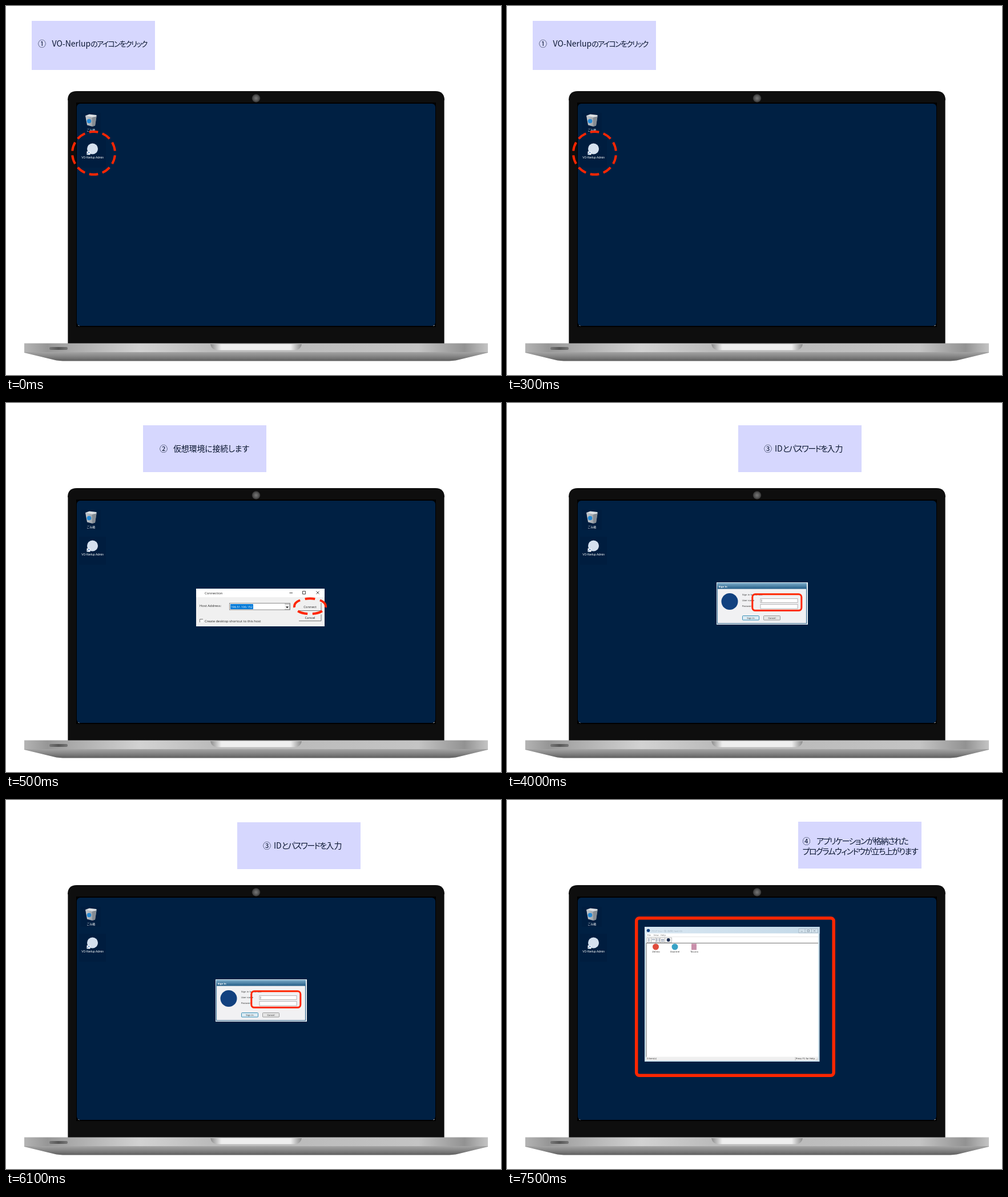
Animation of 867 by 646 pixels, one loop 8000 ms. Source, as an HTML page:

```html
<!DOCTYPE html>
<html lang="ja">
<head>
<meta charset="utf-8">
<title>Connection guide</title>
<style>
  html, body { margin: 0; width: 100%; height: 100%; overflow: hidden; background: #fff; }
  svg { display: block; width: 867px; height: 646px; }

  .scene { opacity: 0; animation: 8s step-end infinite; }
  .click { animation-name: click; }
  .connect { animation-name: connect; }
  .signin { animation-name: signin; }
  .programs { animation-name: programs; }
  @keyframes click { 0% { opacity: 1 } 6.25%, 100% { opacity: 0 } }
  @keyframes connect { 0% { opacity: 0 } 6.25% { opacity: 1 } 50%, 100% { opacity: 0 } }
  @keyframes signin { 0% { opacity: 0 } 50% { opacity: 1 } 93.75%, 100% { opacity: 0 } }
  @keyframes programs { 0% { opacity: 0 } 93.75%, 100% { opacity: 1 } }

  text { white-space: pre; }
  .note rect { fill: #d6d7fe; }
  .note text { font: 500 14px "Noto Sans CJK JP", "Noto Sans CJK", sans-serif; font-feature-settings: "palt"; fill: #0a1630; }
  .tight { letter-spacing: -1.5px; }
  .small { font-size: 13px; letter-spacing: -1.7px; }
  .mark { fill: none; stroke: #ff2600; }
  .desk { font: 5px "Liberation Sans", "Noto Sans CJK JP", sans-serif; fill: #fff; }
  .dialog { font: 5.9px "Open Sans", sans-serif; fill: #222; }
  .tiny { font: 3.9px "DejaVu Sans", "Noto Sans CJK JP", sans-serif; fill: #333; }
  .mid { text-anchor: middle; }
</style>
</head>
<body>
<svg viewBox="0 0 867 646">
  <defs>
    <linearGradient id="deck">
      <stop offset="0" stop-color="#b4b4b4"/>
      <stop offset=".05" stop-color="#969696"/>
      <stop offset=".1" stop-color="#a9a9a9"/>
      <stop offset=".25" stop-color="#d2d2d2"/>
      <stop offset=".4" stop-color="#bcbcbc"/>
      <stop offset=".6" stop-color="#bcbcbc"/>
      <stop offset=".85" stop-color="#c4c4c4"/>
      <stop offset=".95" stop-color="#929292"/>
      <stop offset="1" stop-color="#c4c4c4"/>
    </linearGradient>
    <linearGradient id="belly" x2="0" y2="1">
      <stop offset="0" stop-color="#a8a8a8"/>
      <stop offset=".5" stop-color="#868686"/>
      <stop offset="1" stop-color="#5e5e5e"/>
    </linearGradient>
    <linearGradient id="notch">
      <stop offset="0" stop-color="#8b8b8b"/>
      <stop offset=".12" stop-color="#eee"/>
      <stop offset=".88" stop-color="#eee"/>
      <stop offset="1" stop-color="#8b8b8b"/>
    </linearGradient>
    <linearGradient id="slot">
      <stop offset="0" stop-color="#777"/>
      <stop offset=".5" stop-color="#555"/>
      <stop offset="1" stop-color="#777"/>
    </linearGradient>
    <radialGradient id="lens">
      <stop offset="0" stop-color="#777"/>
      <stop offset=".6" stop-color="#555"/>
      <stop offset="1" stop-color="#333"/>
    </radialGradient>
    <linearGradient id="bar" x2="0" y2="1">
      <stop offset="0" stop-color="#7eaecb"/>
      <stop offset="1" stop-color="#235c86"/>
    </linearGradient>
    <linearGradient id="pale">
      <stop offset="0" stop-color="#d9e7f2"/>
      <stop offset="1" stop-color="#c3d9e8"/>
    </linearGradient>
    <linearGradient id="bin">
      <stop offset="0" stop-color="#c6cacf"/>
      <stop offset="1" stop-color="#868d95"/>
    </linearGradient>
  </defs>

  <!-- Laptop -->
  <path d="M108 591V165Q108 149 124 149H752Q768 149 768 165V591Z" fill="#0e0e0e"/>
  <path d="M108.500 591V165M767.500 591V165" stroke="#666"/>
  <rect x="123" y="169" width="630" height="393" fill="#000"/>
  <path d="M126 559l3 1M748 560l3-1" stroke="#aaa"/>
  <rect x="124" y="171" width="628" height="389" rx="6" fill="#002043"/>
  <circle cx="438" cy="161.500" r="7.200" fill="url(#lens)"/>
  <path d="M32 605H844V607L792 619.500Q784 621.500 770 621.500H106Q92 621.500 84 619.500L32 607Z" fill="url(#belly)"/>
  <rect x="32" y="590.500" width="812" height="15.500" fill="url(#deck)"/>
  <path d="M358 592H518Q516 602.500 505 602.500H371Q360 602.500 358 592Z" fill="url(#notch)"/>
  <rect x="76" y="597" width="32" height="5" rx="2" fill="url(#slot)"/>

  <!-- Desktop icons -->
  <g class="desk">
    <path d="M131 187H166V222H131ZM128 234H175V283H128Z" fill="#001d3f"/>
    <path d="M139 192L158.500 193.500L156 209.500L151 211L142 208.500Z" fill="url(#bin)"/>
    <path d="M139 192L146 189.500L158.500 191L158.500 193.500L151 195Z" fill="#dcdfe2"/>
    <path d="M151 195L151 211L156 209.500L158.500 193.500Z" fill="#858c94"/>
    <circle cx="145.500" cy="201.500" r="3.800" fill="#2589d5"/>
    <text class="mid" x="148.700" y="219">ごみ箱</text>
    <circle cx="151.500" cy="250" r="9.500" fill="#d5e0ee"/>
    <rect x="141.500" y="254.500" width="6" height="6" fill="#fff"/>
    <path d="M143 259.500V258L145.500 256M144 256H146V258" fill="none" stroke="#1f5fae" stroke-width=".8"/>
    <text class="mid" x="151.700" y="266.500">VO-Nerlup Admin</text>
  </g>

  <g class="scene click">
    <g class="note">
      <rect x="45" y="26" width="216" height="86"/>
      <text x="56" y="71">①</text>
      <text x="80.500" y="71">VO-Nerlup<tspan class="small">のアイコンをクリック</tspan></text>
    </g>
    <circle class="mark" cx="153.500" cy="257.500" r="37.500" stroke-width="4" pathLength="240" stroke-dasharray="16 8" stroke-dashoffset="20"/>
  </g>

  <g class="scene connect">
    <g class="note">
      <rect x="240" y="39" width="216" height="82"/>
      <text x="269" y="85">②</text>
      <text x="293" y="85" letter-spacing="-.2">仮想環境に接続します</text>
    </g>
    <g class="dialog">
      <rect x="333" y="325" width="225" height="66" fill="#f0f0f0"/>
      <rect x="333" y="325" width="225" height="15" fill="#fff"/>
      <text x="348" y="334.500">Connection</text>
      <path d="M496.500 332.500H502M519.500 329.500H524.500V334.500H519.500ZM543.500 329.500L548.500 334.500M548.500 329.500L543.500 334.500" fill="none" stroke="#333" stroke-width=".9"/>
      <text x="339" y="357">Host Address:</text>
      <rect x="391.500" y="350.500" width="106" height="11.500" fill="#fff" stroke="#8c8c8c"/>
      <rect x="393" y="352" width="40" height="9" fill="#0078d7"/>
      <text x="393.500" y="359" fill="#fff" font-size="5.400">198.51.100.152</text>
      <path d="M488 352H497V361.500H488" fill="#f0f0f0" stroke="#777" stroke-width=".7"/>
      <path d="M490 356.500H495L492.500 359Z" fill="#000"/>
      <path d="M513 363.500H552V350M513 381.500H552V370" fill="none" stroke="#777"/>
      <text class="mid" x="532.500" y="359">Connect</text>
      <text class="mid" x="532.500" y="377.500">Cancel</text>
      <path d="M339.500 384V378.500H345" fill="none" stroke="#777"/>
      <path d="M340 384V379H345V384Z" fill="#fff"/>
      <text x="348" y="384">Create desktop shortcut to this host</text>
    </g>
    <ellipse class="mark" cx="532.500" cy="355.700" rx="27.500" ry="13.500" stroke-width="4" pathLength="120" stroke-dasharray="16 8" stroke-dashoffset="14"/>
  </g>

  <g class="scene signin">
    <g class="note">
      <rect x="405" y="39" width="216" height="82"/>
      <text x="450" y="85">③</text>
      <text x="469" y="85">ID<tspan class="tight">とパスワードを</tspan>入力</text>
    </g>
    <g class="tiny">
      <rect x="367" y="314" width="160" height="74" fill="#e6edf2"/>
      <rect x="368" y="315" width="157" height="71.500" fill="#245b85"/>
      <rect x="368" y="315" width="157" height="10.500" fill="url(#bar)"/>
      <rect x="369" y="325.500" width="155" height="60" fill="#f1f1f3"/>
      <text x="370.500" y="322.500" fill="#fff" font-weight="bold">Sign In</text>
      <circle cx="390" cy="347.500" r="14.500" fill="#12417f"/>
      <text x="412" y="336.700">Sign in to the host</text>
      <text x="412" y="346.500">User name</text>
      <text x="412" y="357">Password</text>
      <g fill="#fff" stroke="#a5a5a5" stroke-width=".8">
        <rect x="444" y="342.500" width="65" height="7"/>
        <rect x="444" y="352.500" width="65" height="7.500"/>
      </g>
      <path d="M446 344V348.500" stroke="#444" stroke-width=".6"/>
      <rect x="412.500" y="372.500" width="29" height="7.500" rx="1" fill="#dcebf3" stroke="#398fb6"/>
      <rect x="449.500" y="372.500" width="29" height="7.500" rx="1" fill="#e4e4e4" stroke="#999"/>
      <text class="mid" x="427" y="377.500">Sign In</text>
      <text class="mid" x="464" y="377.500">Cancel</text>
    </g>
    <rect class="mark" x="429.800" y="334.800" width="86" height="28.500" rx="5" stroke-width="3"/>
  </g>

  <g class="scene programs">
    <g class="note">
      <rect x="510" y="38" width="216" height="82"/>
      <text x="517.500" y="77">④</text>
      <text class="tight" x="542" y="77">アプリケーションが格納された</text>
      <text class="tight" x="517.500" y="95">プログラムウィンドウが立ち上がります</text>
    </g>
    <g class="tiny">
      <rect x="241" y="222" width="306.500" height="236" fill="#cbdfeb"/>
      <rect x="241" y="222" width="306.500" height="12" fill="url(#pale)"/>
      <rect x="243.500" y="233.500" width="301.500" height="222.500" fill="#fff"/>
      <circle cx="247.500" cy="228.500" r="2.800" fill="#12417f"/>
      <text x="252" y="230.500" fill="#a3b3c0">プログラム一覧 (仮想) host-01</text>
      <g fill="#d3e2ec" stroke="#93a5b3" stroke-width=".6">
        <path d="M511 225.500H544.500V232.500H511ZM522 225.500V232.500M533.500 225.500V232.500"/>
        <path d="M514.500 230H518M526 227.500H529.500V230.500H526ZM537 227.500L540 230.500M540 227.500L537 230.500" fill="none" stroke="#68798a"/>
      </g>
      <g fill="#777">
        <text x="245.500" y="238">File</text>
        <text x="256.500" y="238">View</text>
        <text x="269" y="238">Help</text>
      </g>
      <path d="M244 239.500H545" stroke="#ddd" stroke-width=".7"/>
      <path d="M245 241H288.500V249.500H245ZM252.500 241V249.500M260.500 241V249.500M268.500 241V249.500M276.500 241V249.500" fill="#f4f4f4" stroke="#aaa" stroke-width=".7"/>
      <path d="M248.500 242.500V248M254 244H259M262.500 242.500V248M266.500 242.500V248M270 244.500H275M270 247H275" stroke="#3d5278" stroke-dasharray="1.400 .6"/>
      <circle cx="282.700" cy="245" r="2.900" fill="#17294d"/>
      <path d="M244 451V250.500H545" fill="none" stroke="#747474"/>
      <circle cx="260.500" cy="257" r="5.500" fill="#df4c3c"/>
      <circle cx="294" cy="257" r="5.500" fill="#39a2c5"/>
      <rect x="323" y="251.500" width="9" height="11" fill="#c990ab"/>
      <g class="mid">
        <text x="261" y="267.200">Zelmio</text>
        <text x="294" y="267.200">Ovantrel</text>
        <text x="328" y="267.200">Tovuna</text>
      </g>
      <rect x="243.500" y="449.500" width="301.500" height="6.500" fill="#f0f0f0"/>
      <text x="244.500" y="454.300">3 item(s)</text>
      <text x="506" y="454.300">Press F1 for Help.</text>
      <path d="M505 450V456M541 455.500L544.500 452M543 455.500L544.500 454" stroke="#aaa" stroke-width=".6"/>
    </g>
    <rect class="mark" x="226.700" y="206.700" width="345.500" height="275.500" rx="5" stroke-width="5.500"/>
  </g>
</svg>
</body>
</html>
```
